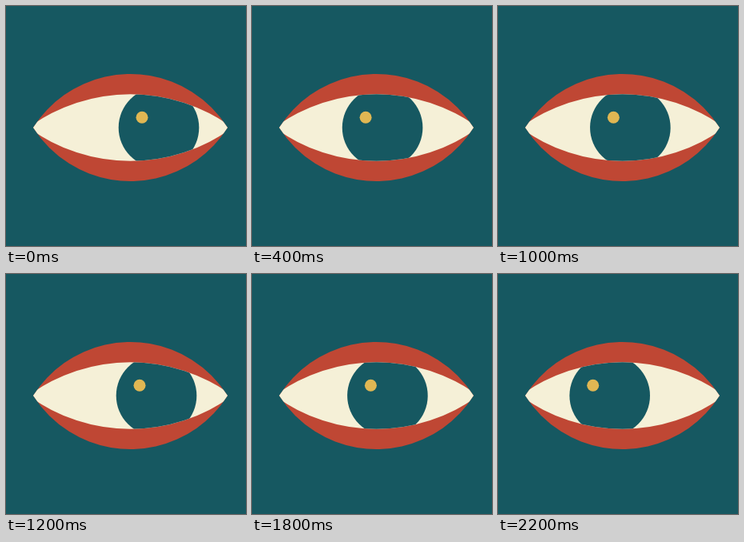
An HTML page with a canvas for the animation above (2.4 s loop, 300x300 px).

```html
<!DOCTYPE html>
<html lang="en">
<head>
<meta charset="utf-8">
<title>Looking eye</title>
<style>
html, body { margin: 0; width: 100%; height: 100%; overflow: hidden; background: #165861; }
canvas { display: block; width: 300px; height: 300px; }
</style>
</head>
<body>
<canvas id="stage"></canvas>
<script>
const LOOP = 2400, STEP = 200;
const TEAL = '#165861', RED = '#bf4734', CREAM = '#f5f0d7', GOLD = '#e0b753';
const MID = 155.5, Y = 152;
const GAZE_RIGHT = 191, GAZE_LEFT = 139.7;

const canvas = document.getElementById('stage');
const ctx = canvas.getContext('2d');
const ratio = window.devicePixelRatio || 1;
canvas.width = canvas.height = 300 * ratio;
ctx.scale(ratio, ratio);

// Smooth swing from 0 to 1 between two times
function swing(t, start, end) {
  const p = Math.min(1, Math.max(0, (t - start) / (end - start)));
  return (1 - Math.cos(Math.PI * p)) / 2;
}

// The gaze goes left, returns, rests, and goes left again
function gazeX(t) {
  const k = swing(t, 53, 710) - swing(t, 710, 1290) + swing(t, 1516, 2148);
  return GAZE_RIGHT + (GAZE_LEFT - GAZE_RIGHT) * k;
}

function disc(x, y, r, color) {
  ctx.fillStyle = color;
  ctx.beginPath();
  ctx.arc(x, y, r, 0, Math.PI * 2);
  ctx.fill();
}

// Almond made of two circular arcs, given its half width and half height
function almond(w, h, color) {
  const r = (w * w + h * h) / (2 * h);
  const a = Math.asin(w / r), up = -Math.PI / 2, down = Math.PI / 2;
  ctx.beginPath();
  ctx.arc(MID, Y - h + r, r, up - a, up + a);
  ctx.arc(MID, Y + h - r, r, down - a, down + a);
  ctx.closePath();
  ctx.fillStyle = color;
  ctx.fill();
  ctx.clip();
}

function draw(t) {
  const x = gazeX(t);
  ctx.fillStyle = TEAL;
  ctx.fillRect(0, 0, 300, 300);

  // The opening is wider than the lids, which cut off its corners
  ctx.save();
  almond(121.5, 67, RED);
  almond(127.5, 41.8, CREAM);
  disc(x, Y, 50.3, TEAL);
  disc(x - 21, 139.2, 7.5, GOLD);
  ctx.restore();
}

const begin = performance.now();
function tick() {
  const t = (performance.now() - begin) % LOOP;
  draw(Math.floor(t / STEP) * STEP);
  requestAnimationFrame(tick);
}
tick();
</script>
</body>
</html>
```
